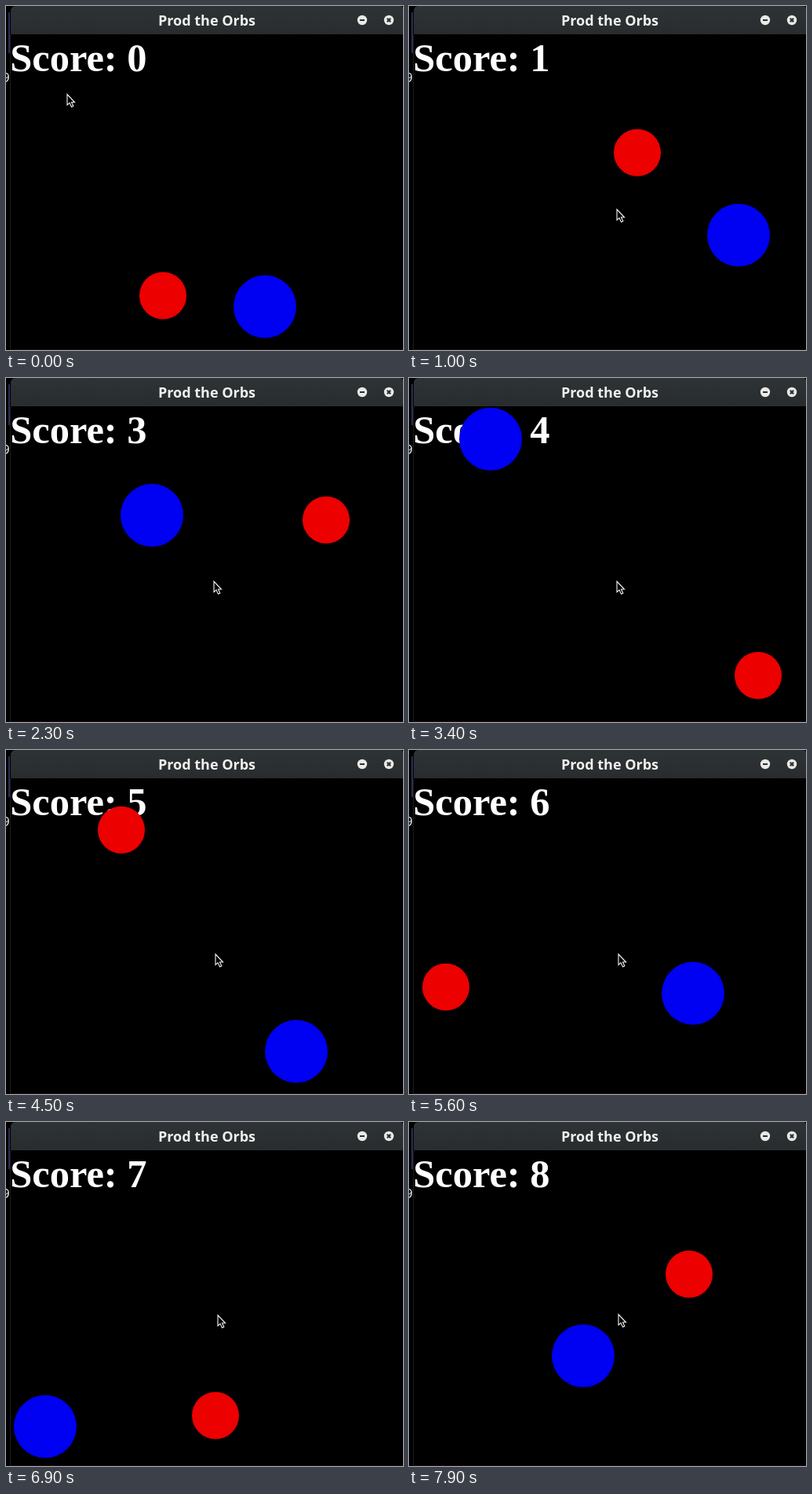
Animation of 506x438 px, one loop 8000 ms. Source, as an HTML page with a canvas:

```html
<!DOCTYPE html>
<html lang="en">
<head>
<meta charset="utf-8">
<title>Prod the Orbs</title>
<style>
html, body { margin: 0; width: 100%; height: 100%; overflow: hidden; background: #000; }
canvas { display: block; }
</style>
</head>
<body>
<canvas id="stage" width="506" height="438"></canvas>
<script>
const ctx = document.getElementById('stage').getContext('2d');
const LOOP = 8000, STEP = 100;
const FIELD = { left: 6, top: 37, right: 506, bottom: 437 };

// Each round: when it begins, a reference tick, and each dot's [x, y, vx, vy] at that tick.
const rounds = [
  { from: 0, tick: 0, red: [200, 369, 1, -2], blue: [330, 383, 2, -1] },
  { from: 4050, tick: 506, red: [47, 302, -1, 2], blue: [362, 310, -2, -1] },
  { from: 6850, tick: 623, red: [267, 374, 1, -2], blue: [50, 388, -2, -1] }
];

// Pointer keys: time, x, y
const pointer = [
  [0, 78, 112.5], [100, 78, 112.5], [850, 265, 259], [3900, 265, 259],
  [4050, 267, 260], [6500, 267, 260], [6850, 270, 246],
  [7100, 270, 246], [7500, 267, 245], [LOOP, 267, 245]
];

function bounce(v, lo, hi) {
  const span = hi - lo, period = span * 2;
  const u = (((v - lo) % period) + period) % period;
  return lo + (u > span ? period - u : u);
}

function disc(x, y, r, color) {
  ctx.fillStyle = color;
  ctx.beginPath();
  ctx.arc(x, y, r, 0, Math.PI * 2);
  ctx.fill();
}

function dot([x, y, vx, vy], n, r, color) {
  disc(bounce(x + vx * n, FIELD.left + r, FIELD.right - r),
       bounce(y + vy * n, FIELD.top + r, FIELD.bottom - r) - 0.3, r, color);
}

function text(str, x, y, font, color, align = 'left') {
  ctx.font = font;
  ctx.fillStyle = color;
  ctx.textAlign = align;
  ctx.fillText(str, x, y);
}

function line(x1, y1, x2, y2) {
  ctx.beginPath();
  ctx.moveTo(x1, y1);
  ctx.lineTo(x2, y2);
  ctx.stroke();
}

function drawDesktop() {
  ctx.fillStyle = '#000';
  ctx.fillRect(0, 0, 506, 438);
  ctx.fillStyle = '#2c2c58';
  ctx.fillRect(3, 8, 2, 52);
  text('9', -5, 97, '17px "Open Sans", sans-serif', '#f0f0f0');
  ctx.fillStyle = '#000';
  ctx.fillRect(6, 37, 500, 401);
  ctx.fillStyle = '#1c1c1c';
  ctx.fillRect(5, 36, 1, 402);
  ctx.fillStyle = '#1c0a10';
  ctx.fillRect(6, 437, 500, 1);
}

function drawTitleBar() {
  const shade = ctx.createLinearGradient(0, 0, 0, 36);
  shade.addColorStop(0, '#2e3335');
  shade.addColorStop(1, '#282c2e');
  ctx.fillStyle = shade;
  ctx.beginPath();
  ctx.roundRect(6, 0, 500, 36, [6, 4, 0, 0]);
  ctx.fill();
  text('Prod the Orbs', 256, 24.5, 'bold 18px "Open Sans", "Noto Sans", sans-serif', '#f0f0ee', 'center');
  disc(454, 18, 6.2, '#e9e9e7');
  disc(488, 18, 6.2, '#e9e9e7');
  ctx.strokeStyle = '#2b2f31';
  ctx.lineWidth = 2;
  line(451, 18, 457, 18);
  line(485.8, 15.8, 490.2, 20.2);
  line(490.2, 15.8, 485.8, 20.2);
}

function drawPointer(t) {
  const i = pointer.findIndex(k => k[0] > t);
  const [t0, x0, y0] = pointer[i - 1], [t1, x1, y1] = pointer[i];
  const p = (t - t0) / (t1 - t0), e = p * p * (3 - 2 * p);
  ctx.save();
  ctx.translate(x0 + (x1 - x0) * e, y0 + (y1 - y0) * e);
  ctx.beginPath();
  for (const [x, y] of [[0, 0], [0, 13.5], [3, 10.8], [5.5, 16], [7.8, 15], [5.5, 10], [9.5, 10]]) ctx.lineTo(x, y);
  ctx.closePath();
  ctx.fillStyle = '#000';
  ctx.fill();
  ctx.strokeStyle = '#f4f4f4';
  ctx.lineWidth = 1.1;
  ctx.stroke();
  ctx.restore();
}

function draw(t) {
  const tick = Math.floor(t * 0.0902 + 0.9);
  const round = rounds.filter(r => r.from <= t).pop();
  const score = Math.floor((t + 850) / 1000);
  drawDesktop();
  drawTitleBar();
  text('Score: ' + score, 5.2, 82.5, 'bold 50.5px "Liberation Serif", "Times New Roman", serif', '#fff');
  dot(round.red, tick - round.tick, 30, '#ec0000');
  dot(round.blue, tick - round.tick, 40, '#0000f3');
  drawPointer(t);
}

const start = performance.now();
function loop() {
  const t = (performance.now() - start) % LOOP;
  draw(Math.floor(t / STEP) * STEP);
  requestAnimationFrame(loop);
}
loop();
</script>
</body>
</html>
```
